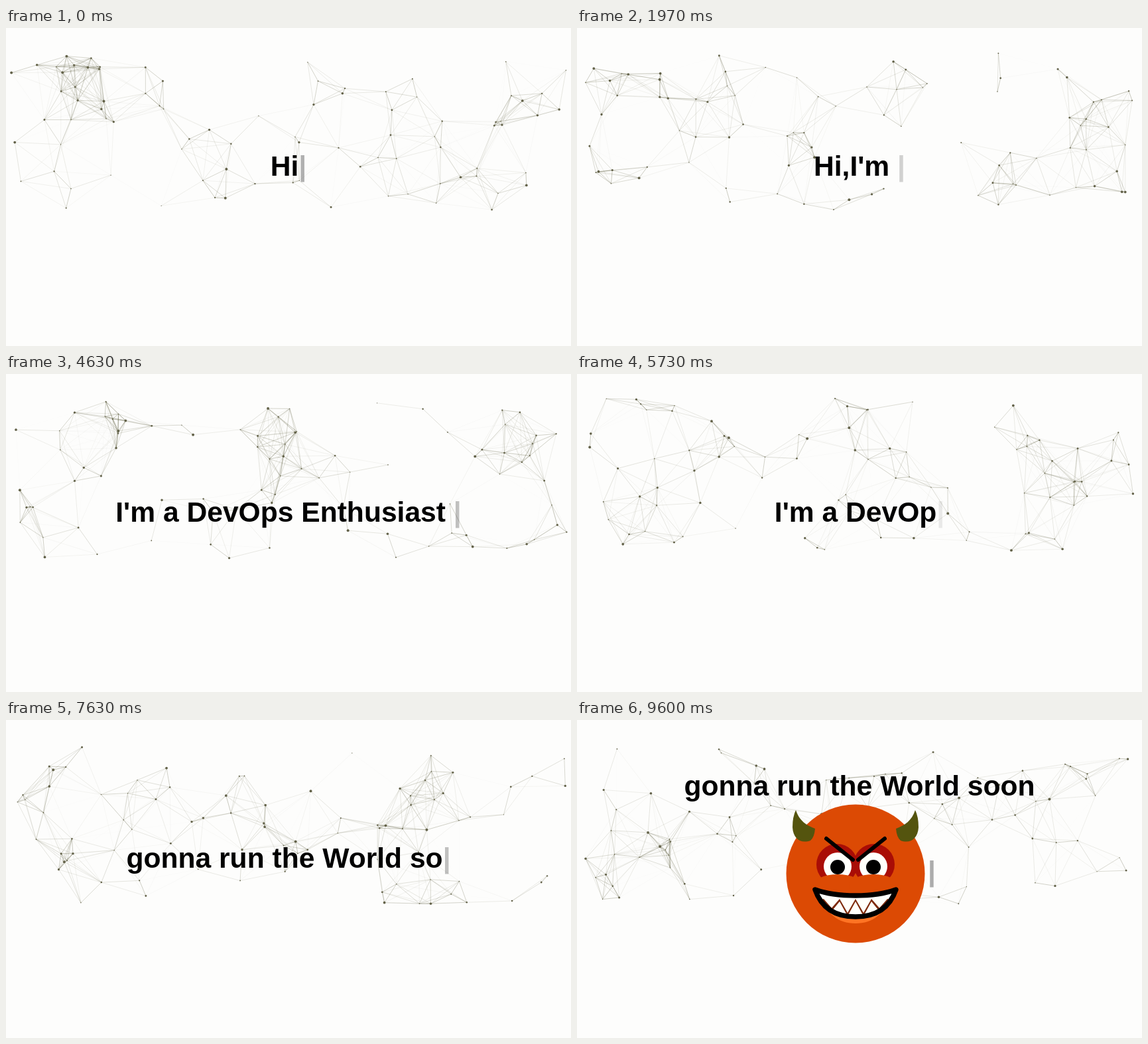
Animation of 852x480 px, one loop 9670 ms. Source, as an HTML page with a canvas:

```html
<!DOCTYPE html>
<html lang="en">
<head>
<meta charset="utf-8">
<title>Typed greeting</title>
<style>
  html, body { margin: 0; width: 100%; height: 100%; overflow: hidden; background: #fdfdfc; }
  canvas { position: absolute; left: 0; top: 0; }
  #line {
    position: absolute; left: 0; top: 184px; width: 852px;
    font: bold 42.6px/48px "Liberation Sans", Arial, sans-serif;
    color: #000; text-align: center; white-space: pre;
  }
  #line.raised { top: 75px; }
  .raised #cursor { position: absolute; left: 529px; top: 129px; }
</style>
</head>
<body>
<canvas id="stage" width="852" height="480"></canvas>
<div id="line"><span id="typed"></span><span id="cursor">|</span></div>
<script>
const LOOP = 9670, TYPE_MS = 52, ERASE_MS = 59, FACE_AT = 7790;
const COUNT = 86, LINK = 95, SPEED = 0.15;
const ORANGE = "#dc4a04", RED = "#a90d06", BROWN = "#7e2b0c", WHITE = "#fffffb";
const lines = [
  { text: "Hi,I'm Ludi", type: -130, erase: 1775 },
  { text: "I'm a DevOps Enthusiast ", type: 2432, erase: 5010 },
  { text: "gonna run the World soon ", type: 6440, erase: Infinity }
];
const $ = id => document.getElementById(id);
const ctx = $("stage").getContext("2d");
const clamp = (v, lo, hi) => Math.min(hi, Math.max(lo, v));

let seed = 20;
function random() {
  seed = (seed * 1664525 + 1013904223) % 4294967296;
  return seed / 4294967296;
}

const particles = Array.from({ length: COUNT }, () => ({
  x: 5 + random() * 842, y: 37 + random() * 242,
  vx: (random() - 0.5) * SPEED, vy: (random() - 0.5) * SPEED,
  r: 0.6 + 1.4 * random() ** 1.5
}));

// Position of something bouncing between two walls
function bounce(v, lo, hi) {
  const span = hi - lo, m = (((v - lo) % (2 * span)) + 2 * span) % (2 * span);
  return lo + (m < span ? m : 2 * span - m);
}

function drawNet(t) {
  const dots = particles.map(p => ({
    x: bounce(p.x + p.vx * t, 5, 847), y: bounce(p.y + p.vy * t, 37, 279), r: p.r
  }));
  ctx.lineWidth = 0.7;
  dots.forEach((a, i) => {
    for (const b of dots.slice(i + 1)) {
      const near = 1 - Math.hypot(a.x - b.x, a.y - b.y) / LINK;
      if (near <= 0) continue;
      ctx.strokeStyle = `rgba(70,70,35,${0.5 * near})`;
      ctx.beginPath();
      ctx.moveTo(a.x, a.y);
      ctx.lineTo(b.x, b.y);
      ctx.stroke();
    }
  });
  dots.forEach(d => disc(d.x, d.y, d.r, "#626148"));
}

function disc(x, y, rx, color, ry = rx) {
  ctx.fillStyle = color;
  ctx.beginPath();
  ctx.ellipse(x, y, rx, ry, 0, 0, 7);
  ctx.fill();
}

function polygon(points, color) {
  ctx.fillStyle = color;
  ctx.beginPath();
  for (const point of points) ctx.lineTo(...point);
  ctx.fill();
}

// Key points of the face's left half, relative to its centre; the right is mirrored
const grin = {
  mask: [-28, -14, 31], eye: [-27, -11, 21, 11], cheek: [-27, 18, 37, 17],
  brow: [-44, -53, -24, -37, -4, -21],
  corner: [-61, 24], top: [-42, 31, -20, 33], bottom: [-52, 50, -32, 65], lips: [33, 65],
  upper: [12, 38, 0, 59, -0.9], lower: [12, 42, 0, 64, -0.9], open: [0]
};
const roar = {
  mask: [-32, -64, 31], eye: [-27, -62, 23, 13], cheek: [-27, -33, 29, 18],
  brow: [-59, -80, -38, -103, -3, -82],
  corner: [-86, 4], top: [-60, -30, -30, -40], bottom: [-78, 28, -72, 43], lips: [-40, 42],
  upper: [17, -34, 2.6, 1, 1.7], lower: [13.5, 15, 0, 38, 0], open: [1]
};

function mix(k) {
  const pose = {};
  for (const part in grin)
    pose[part] = grin[part].map((v, i) => v + (roar[part][i] - v) * k);
  return pose;
}

function bothSides(draw) {
  for (const side of [1, -1]) {
    ctx.save();
    ctx.scale(side, 1);
    draw();
    ctx.restore();
  }
}

function drawHorns() {
  bothSides(() => {
    ctx.fillStyle = "#54540e";
    ctx.beginPath();
    ctx.moveTo(-90, -96);
    ctx.bezierCurveTo(-85, -80, -74, -73, -61, -68);
    ctx.quadraticCurveTo(-62, -55, -68, -50);
    ctx.bezierCurveTo(-82, -45, -94, -52, -95, -70);
    ctx.quadraticCurveTo(-95, -86, -90, -96);
    ctx.fill();
  });
}

function mouthPath({ corner: [cx, cy], top: t, bottom: b, lips: [high, low] }) {
  ctx.beginPath();
  ctx.moveTo(cx, cy);
  ctx.bezierCurveTo(...t, 0, high);
  ctx.bezierCurveTo(-t[2], t[3], -t[0], t[1], -cx, cy);
  ctx.bezierCurveTo(-b[0], b[1], -b[2], b[3], 0, low);
  ctx.bezierCurveTo(b[2], b[3], b[0], b[1], cx, cy);
  ctx.closePath();
}

// Edge of a row of teeth from the middle outwards, high and low by turns
function zigzag([step, high, highBend, low, lowBend], count) {
  return Array.from({ length: count }, (_, i) =>
    [-i * step, i % 2 ? low + (i * i - 1) * lowBend : high + i * i * highBend]);
}

function drawMouth(p) {
  const [open] = p.open, [cx, cy] = p.corner;
  ctx.save();
  ctx.translate(0, 10);
  ctx.scale(0.84, 1);
  mouthPath(p);
  ctx.fillStyle = "#ff7424";
  ctx.fill();
  ctx.restore();

  mouthPath(p);
  ctx.save();
  ctx.clip();
  ctx.fillStyle = WHITE;
  ctx.fill();
  bothSides(() => {
    polygon([...zigzag(p.upper, 5), ...zigzag(p.lower, 6).reverse()], BROWN);
    polygon([[cx, cy], [cx + 20 * open, cy - 18 * open], [cx + 14 * open, cy + 40 * open]], "#000");
  });
  disc(0, 15, 23 * open, "#000");
  disc(0, 4, 6 * open, BROWN, 10 * open);
  ctx.restore();

  mouthPath(p);
  ctx.lineWidth = 7.5;
  ctx.stroke();
}

function drawEyes({ mask, eye: [x, y, white, pupil], cheek, brow }) {
  bothSides(() => disc(...mask, RED));
  bothSides(() => {
    disc(x, y, white, WHITE);
    disc(x, y + 1, pupil, "#000");
    disc(cheek[0], cheek[1], cheek[2], ORANGE, cheek[3]);
  });
  ctx.lineWidth = 6;
  bothSides(() => {
    ctx.beginPath();
    ctx.moveTo(brow[0], brow[1]);
    ctx.quadraticCurveTo(...brow.slice(2));
    ctx.stroke();
  });
}

function drawFace(age) {
  const ramp = clamp((age - 120) / 300, 0, 1) - clamp((age - 1400) / 300, 0, 1);
  const k = ramp * ramp * (3 - 2 * ramp);
  const pose = mix(k);
  ctx.save();
  ctx.translate(420, 232);
  ctx.lineCap = ctx.lineJoin = "round";
  ctx.strokeStyle = "#000";
  if (k >= 0.5) drawHorns();
  disc(0, 0, 104.5, ORANGE);
  if (k < 0.5) drawHorns();
  drawEyes(pose);
  drawMouth(pose);
  ctx.restore();
}

function typedText(t) {
  const { text, type, erase } = lines.filter(l => l.type <= t).pop();
  const added = Math.min(text.length, Math.floor((t - type) / TYPE_MS));
  const removed = t < erase ? 0 : Math.floor((t - erase) / ERASE_MS) + 1;
  return text.slice(0, Math.max(0, added - removed));
}

const cursorBlink = $("cursor").animate(
  [0, 1, 0].map(opacity => ({ opacity, easing: "ease" })),
  { duration: 1000, iterations: Infinity }
);
cursorBlink.pause();

function render(t) {
  const withFace = t >= FACE_AT, text = typedText(t);
  ctx.clearRect(0, 0, 852, 480);
  drawNet(t);
  if (withFace) drawFace(t - FACE_AT);
  $("line").classList.toggle("raised", withFace);
  $("typed").textContent = withFace ? text.trim() : text;
  cursorBlink.currentTime = t + 100;
}

const start = performance.now();
function tick() {
  render((performance.now() - start) % LOOP);
  requestAnimationFrame(tick);
}
tick();
</script>
</body>
</html>
```
